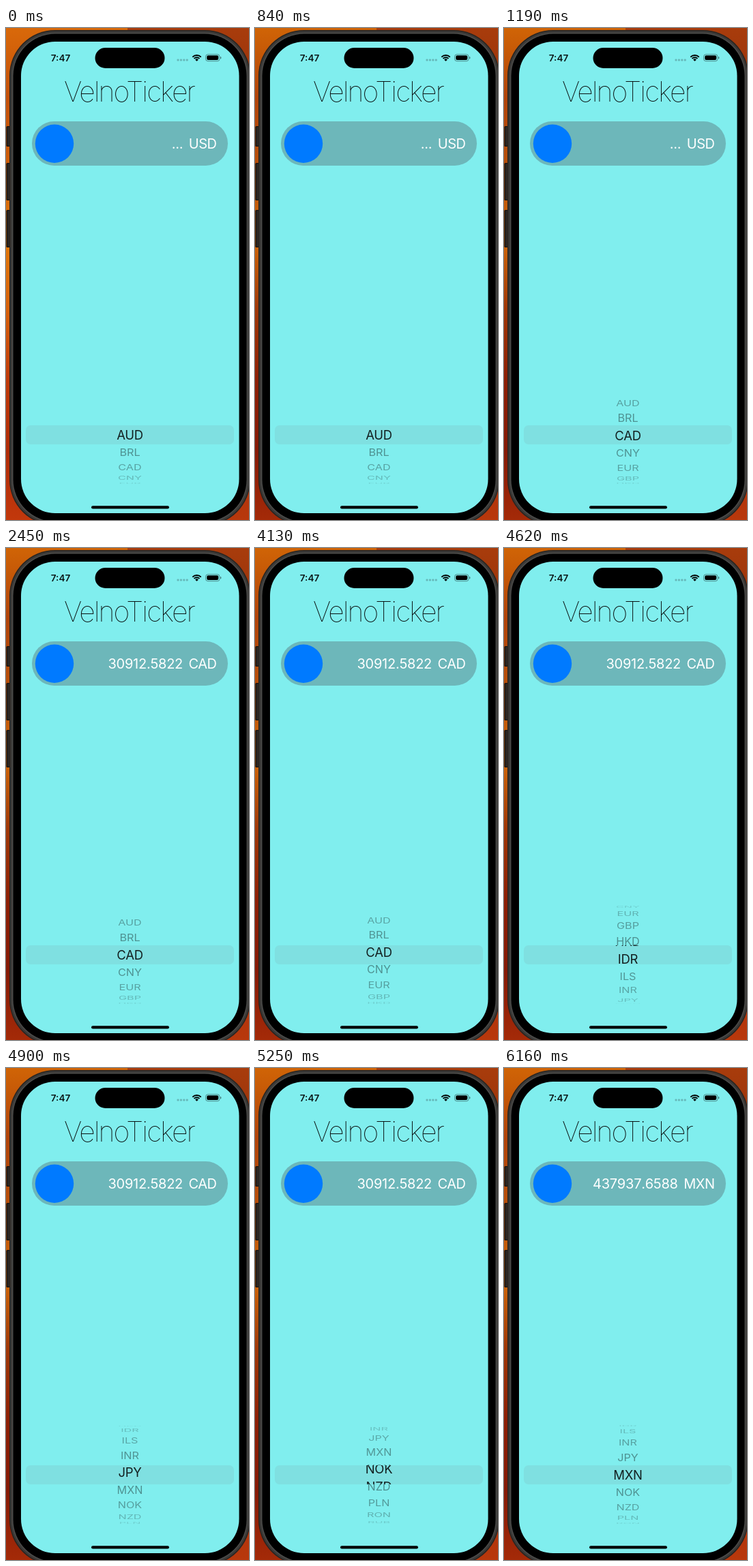
An HTML page with a canvas that plays this animation: 356 by 722 pixels, repeating every 8 s.

```html
<!DOCTYPE html>
<html lang="en">
<head>
<meta charset="utf-8">
<title>Coin price picker</title>
<style>
  html, body { margin: 0; width: 100%; height: 100%; overflow: hidden; background: #000; }
  canvas { display: block; width: 356px; height: 722px; }
</style>
</head>
<body>
<canvas id="stage"></canvas>
<script>
const WIDTH = 356, HEIGHT = 722, LOOP = 8000, STEP = 70;
const CENTER_X = 181.5;
const canvas = document.getElementById("stage");
const ctx = canvas.getContext("2d");
const ratio = window.devicePixelRatio || 1;
canvas.width = WIDTH * ratio;
canvas.height = HEIGHT * ratio;

const CURRENCIES = ("AUD BRL CAD CNY EUR GBP HKD IDR ILS INR JPY MXN NOK NZD " +
  "PLN RON RUB SEK SGD USD ZAR").split(" ");

// Wheel position in rows: [time in ms, row]
const SCROLL = [
  [0, 0], [840, 0], [910, 0.3], [980, 0.9], [1050, 1.45], [1120, 1.8], [1190, 1.96],
  [1330, 1.96], [1400, 2],
  [4060, 2], [4130, 2.15], [4270, 3.05], [4410, 4.34], [4620, 6.75], [4900, 10.14],
  [5040, 11.42], [5110, 11.85], [5180, 12.15], [5250, 12.34], [5390, 12.34],
  [5460, 11.8], [5530, 11.25], [5600, 11.04], [5740, 11.04], [5810, 11], [LOOP, 11]
];

const WHEEL = { y: 597, radius: 72, rowAngle: 20.7 * Math.PI / 180 };
const BAND = { top: 583, bottom: 611 };

function scrollAt(time) {
  const next = Math.max(1, SCROLL.findIndex(key => key[0] >= time));
  const [t0, p0] = SCROLL[next - 1], [t1, p1] = SCROLL[next];
  return p0 + (p1 - p0) * (time - t0) / (t1 - t0);
}

function box(x, y, w, h, r, fill) {
  ctx.beginPath();
  ctx.roundRect(x, y, w, h, r);
  ctx.fillStyle = fill;
  ctx.fill();
}

function disc(x, y, r, fill) {
  ctx.beginPath();
  ctx.arc(x, y, r, 0, Math.PI * 2);
  ctx.fillStyle = fill;
  ctx.fill();
}

function text(string, x, y, { size, weight = 400, fill = "#000", align = "center", spacing = 0 }) {
  ctx.font = `${weight} ${size}px Inter, "Open Sans", sans-serif`;
  ctx.letterSpacing = spacing + "px";
  ctx.textAlign = align;
  ctx.fillStyle = fill;
  ctx.fillText(string, x, y);
  return ctx.measureText(string).width;
}

function shade(x, width, colors) {
  const gradient = ctx.createLinearGradient(0, 0, 0, HEIGHT);
  colors.forEach((color, i) => gradient.addColorStop(i / (colors.length - 1), color));
  ctx.fillStyle = gradient;
  ctx.fillRect(x, 0, width, HEIGHT);
}

function drawWallpaper(bright) {
  shade(0, WIDTH / 2, bright
    ? ["#d9690a", "#c4500a", "#d0600a", "#e27a0c", "#d8620c", "#c03a0a", "#b02c08", "#c2380c"]
    : ["#d06406", "#b2440a", "#b8500a", "#d0680a", "#a03808", "#8e2006", "#861a06", "#a42a08"]);
  shade(WIDTH / 2, WIDTH / 2, ["#a83c0c", "#8a2a0a", "#7c2008", "#a02c0a", "#b8380c"]);
}

function drawPhone() {
  for (const [y, h] of [[144, 30], [198, 55], [267, 55]]) {
    box(0.5, y, 7, h, 1.5, "#17120f");
    box(2, y + 1, 3, h - 2, 1, "#2c2622");
  }
  box(5, 3, 353, 727, 67, "#2a2622");
  box(6.5, 4.5, 350, 724, 66, "#3c3b39");
  box(9, 7, 345, 719, 63.5, "#4c4c4a");
  box(10.5, 8.5, 342, 716, 62, "#000");
  box(22, 20, 319.5, 692, 50, "#80eeee");
  box(130.5, 29, 102, 30, 15, "#000");
  box(125, 701.3, 114, 4.2, 2.1, "#000");
}

function drawStatusBar() {
  text("7:47", 80, 48.8, { size: 13.5, weight: 600, fill: "#0a1616" });
  for (let i = 0; i < 4; i++) box(250.5 + i * 4.4, 45.5, 3, 3, 1, "#66b7b9");

  // Wi-Fi: a dot and two arcs fanning out of one point
  const fan = [-Math.PI * 0.75, -Math.PI * 0.25];
  ctx.strokeStyle = ctx.fillStyle = "#000";
  ctx.lineWidth = 1.9;
  for (const r of [5.6, 8.8]) {
    ctx.beginPath();
    ctx.arc(279.5, 48.8, r, ...fan);
    ctx.stroke();
  }
  ctx.beginPath();
  ctx.moveTo(279.5, 48.8);
  ctx.arc(279.5, 48.8, 3.3, ...fan);
  ctx.fill();

  ctx.beginPath();
  ctx.roundRect(292.5, 38.7, 20.5, 10, 3.4);
  ctx.strokeStyle = "rgba(0,0,0,.4)";
  ctx.lineWidth = 1;
  ctx.stroke();
  box(294.2, 40.3, 17, 6.8, 2, "#000");
  box(314, 42, 1.4, 3.4, [0, 1.4, 1.4, 0], "rgba(0,0,0,.45)");
}

function drawPrice(time) {
  const code = time < 1400 ? "USD" : time < 5810 ? "CAD" : "MXN";
  const amount = time < 2450 ? "..." : time < 6160 ? "30912.5822" : "437937.6588";
  const right = 308.5;
  const style = { size: 20, fill: "#fff", align: "right" };
  box(38, 137, 287, 65, 32.5, "#6db7ba");
  disc(71, 169.8, 28.2, "#007aff");
  const codeWidth = text(code, right, 177, { ...style, spacing: -0.5 });
  ctx.fontKerning = "none";
  text(amount, right - codeWidth - 8.5, 177, { ...style, spacing: -0.25 });
  ctx.fontKerning = "auto";
}

function drawRows(position, top, bottom, selected) {
  const size = selected ? 18.5 : 16.2;
  const spacing = selected ? -0.3 : 0;
  ctx.save();
  ctx.beginPath();
  ctx.rect(29, top, 305, bottom - top);
  ctx.clip();
  CURRENCIES.forEach((code, i) => {
    const angle = (i - position) * WHEEL.rowAngle;
    const depth = Math.cos(angle);
    if (Math.abs(angle) >= Math.PI / 2) return;
    ctx.save();
    ctx.translate(CENTER_X, WHEEL.y + WHEEL.radius * Math.sin(angle));
    ctx.scale(1, depth);
    const alpha = selected ? 0.86 : 0.06 + 0.35 * depth;
    text(code, 0, size * 0.364, { size, spacing, fill: `rgba(0,0,0,${alpha})` });
    ctx.restore();
  });
  ctx.restore();
}

function drawPicker(position) {
  box(29, BAND.top, 305, BAND.bottom - BAND.top, 7, "#7fe0e1");
  drawRows(position, 524, BAND.top, false);
  drawRows(position, BAND.top, BAND.bottom, true);
  drawRows(position, BAND.bottom, 670, false);
}

function frame() {
  const time = Math.floor((performance.now() % LOOP) / STEP) * STEP;
  ctx.setTransform(ratio, 0, 0, ratio, 0, 0);
  drawWallpaper(time < 840);
  drawPhone();
  drawStatusBar();
  text("VelnoTicker", CENTER_X - 1, 107.5, { size: 41, weight: 100, spacing: -2 });
  drawPrice(time);
  drawPicker(scrollAt(time));
  requestAnimationFrame(frame);
}
frame();
</script>
</body>
</html>
```
